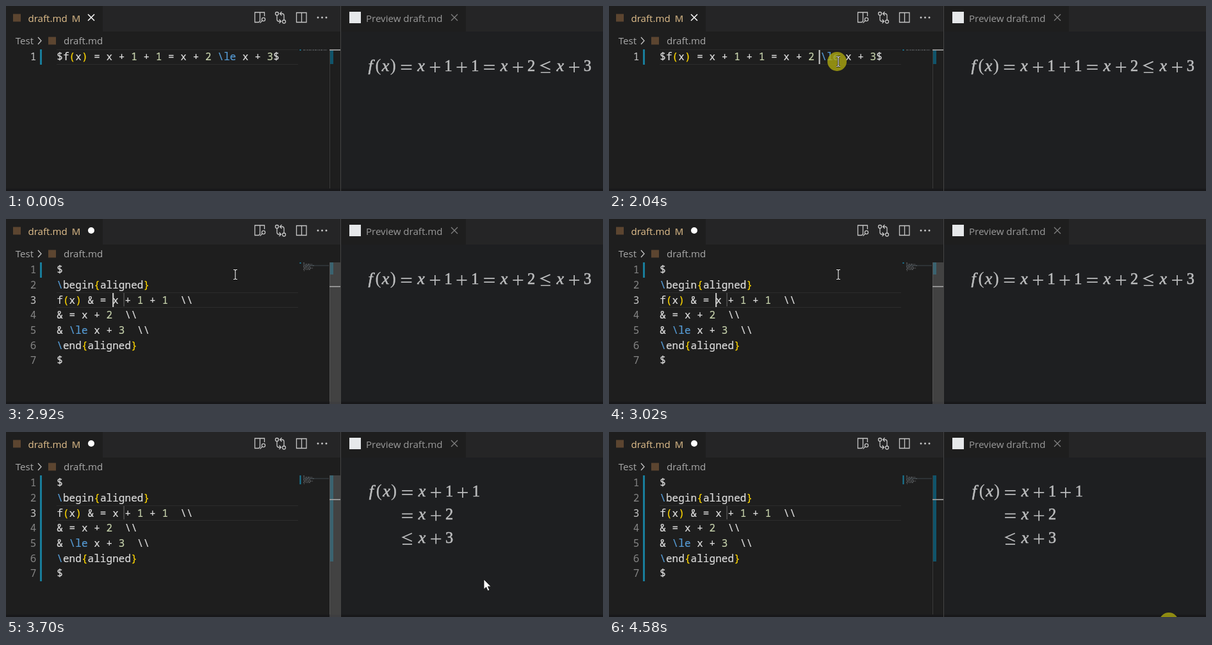
Write an HTML page that moves like this. It is 932 px wide and 290 px high and loops after 4.81 s.

```html
<!DOCTYPE html>
<html lang="en">
<head>
<meta charset="utf-8">
<title>Aligning a formula</title>
<style>
  html, body { margin: 0; width: 100%; height: 100%; overflow: hidden; background: #1e1e1e; }
  svg { display: block; }
  text { white-space: pre; }
  .ui { font: 15.1px "Open Sans", "Noto Sans", sans-serif; }
  .code { font: 16px "Noto Sans Mono", monospace; letter-spacing: .05px; fill: #dcdcdc; }
  .code tspan { stroke: currentColor; stroke-width: .2; color: #dcdcdc; }
  .code .cmd { fill: #569cd6; color: #569cd6; }
  .code .brk { fill: #ffd700; color: #ffd700; }
  .code .num { fill: #c6d2ac; color: #c6d2ac; }
  .math text { font: 24.2px "Liberation Serif", serif; fill: #bcbdbe; stroke: #bcbdbe; stroke-width: .6; text-anchor: middle; }
  .math .it { font-style: italic; font-size: 26px; }
  .math .par { font-size: 27px; stroke-width: .2; }
  .math path { stroke: #bcbdbe; stroke-width: 1.7; fill: none; }
  .icon { fill: none; stroke: #c5c5c5; stroke-width: 1.3; }
  .tiny { fill: none; stroke: #707478; stroke-width: 1.1; stroke-dasharray: 3 1 1 1 2 1; }
</style>
</head>
<body>
<svg width="932" height="290" viewBox="0 0 932 290">
  <rect width="932" height="290" fill="#1e1e1e"/>
  <rect x="151" width="371" height="40" fill="#252526"/>
  <rect x="718" width="214" height="40" fill="#252526"/>
  <rect x="523" y="40" width="409" height="250" fill="#1e1f21"/>
  <rect y="286.500" width="932" height="3.500" fill="#18181a"/>

  <!-- tabs and breadcrumb -->
  <rect x="11" y="12.500" width="12" height="12" fill="#5c4530"/>
  <rect x="66" y="48.500" width="12" height="12" fill="#5c4530"/>
  <rect x="536" y="9" width="18" height="18" fill="#e6e8ea"/>
  <g class="ui">
    <text x="34.500" y="24.500" fill="#e2c08d">draft.md</text>
    <text x="102.500" y="24.500" fill="#b59b73" font-weight="600">M</text>
    <text x="14.800" y="60" fill="#a9a9a9">Test</text>
    <text x="90" y="60" fill="#a9a9a9">draft.md</text>
    <text x="562" y="24.500" fill="#9a9a9a">Preview draft.md</text>
  </g>
  <path class="icon" d="M50 49l5 5.500l-5 5.500" stroke="#a9a9a9"/>
  <path id="saved" d="M128 13l10 10M138 13l-10 10" stroke="#fff" stroke-width="1.500"/>
  <circle id="unsaved" cx="133" cy="18" r="5" fill="#fff"/>
  <path d="M695 13l10 10M705 13l-10 10" stroke="#808080" stroke-width="1.300"/>

  <!-- editor actions -->
  <g class="icon">
    <path d="M396.500 10H388.500V25.500H394.500L396.500 23.500V10H403.500V16"/>
    <circle cx="402" cy="21" r="2.600"/><path d="M400 23l-3.500 3.500"/>
    <circle cx="423" cy="12" r="2.500"/><circle cx="434" cy="24.500" r="2.500"/>
    <path d="M423 14.500V21Q423 24 426 24H429M426.500 21l3 3l-3 3M434 22V15Q434 12 431 12H428M430.500 9l-3 3l3 3"/>
    <path d="M453.500 10.500H469V25.500H453.500ZM461.500 10.500V25.500"/>
  </g>
  <g fill="#c5c5c5"><circle cx="487" cy="18" r="1.500"/><circle cx="493.500" cy="18" r="1.500"/><circle cx="500" cy="18" r="1.500"/></g>

  <!-- editor -->
  <path id="row" d="M79 68.500H456M79 91.500H456" stroke="#2c2c2c"/>
  <rect id="sel" x="339.500" y="69" width="19" height="22" fill="#30485e"/>
  <rect id="gutter" x="53" y="68" width="3" fill="#187d9b"/>
  <g id="before" class="code"></g>
  <g id="after" class="code"></g>
  <rect id="stop" x="183.500" y="116" width="1.200" height="21" fill="#5c5c5c"/>
  <rect id="caret" width="2" height="22" fill="#d0d0cf"/>

  <!-- minimap and overview ruler -->
  <rect id="mark" x="458.500" y="68" width="2" fill="#187d9b"/>
  <path id="mini1" class="tiny" d="M464 69H501"/>
  <g id="mini7"></g>
  <path d="M505.500 68V286" stroke="#3a3a3a"/>
  <rect id="changed" x="506" y="68" width="5" fill="#10546a"/>
  <rect id="found" x="511" y="68" width="6" height="23" fill="#8c8c8c"/>
  <rect id="slider" x="505" y="68" width="18" height="222" fill="#797979" fill-opacity=".4"/>
  <rect id="place" x="505" width="18" height="1.800" fill="#9a9a9a"/>
  <path d="M522.500 0V290" stroke="#444"/>

  <!-- preview -->
  <g id="flat" class="math"></g>
  <g id="stacked" class="math"></g>

  <!-- pointer -->
  <circle id="press" r="15" fill="#b0ab10" fill-opacity=".78"/>
  <path id="arrow" d="M0 0V15.500L3.600 12.200L6.200 18L8.800 16.800L6.300 11.200H11Z" fill="#fff" stroke="#111" stroke-width=".8"/>
  <g id="beam" fill="none">
    <path d="M-3 -7.500H-1L0 -6.500L1 -7.500H3M0 -6.500V6.500M-3 7.500H-1L0 6.500L1 7.500H3" stroke="#111" stroke-width="2.600"/>
    <path d="M-3 -7.500H-1L0 -6.500L1 -7.500H3M0 -6.500V6.500M-3 7.500H-1L0 6.500L1 7.500H3" stroke="#e8e8e8" stroke-width="1.200"/>
  </g>
</svg>
<script>
const LOOP = 4810, LINE = 23.7, EM = 24.2;
const $ = id => document.getElementById(id);

function add(parent, tag, attrs, text) {
  const el = document.createElementNS("http://www.w3.org/2000/svg", tag);
  for (const k in attrs) el.setAttribute(k, attrs[k]);
  if (text) el.textContent = text;
  parent.append(el);
  return el;
}

// Code lines, coloured by token
function code(parent, lines, active) {
  lines.forEach((line, i) => {
    const y = 85.2 + LINE * i;
    add(parent, "text", { x: 47.5, y, "text-anchor": "end", fill: i === active ? "#c6c6c6" : "#858585" }, String(i + 1));
    const row = add(parent, "text", { x: 79.3, y });
    for (const part of line.match(/\\le|\\(?=[be])|[(){}]|\d|[^\\(){}\d]+|\\/g)) {
      const kind = part === "\\le" || (part === "\\" && /^\\[be]/.test(line)) ? "cmd"
        : /[(){}]/.test(part) ? "brk" : /\d/.test(part) ? "num" : "";
      add(row, "tspan", { class: kind }, part);
    }
  });
}

// Formula layout in em: glyph width, plus the space around operators
const WIDTH = { f: .597, "(": .389, ")": .389, x: .5715 };
const OPS = {
  "+": [.222, "M-8 0H8M0 -8V8"],
  "=": [.278, "M-8.300 -2.850H8.300M-8.300 2.850H8.300"],
  "≤": [.278, "M7.300 -8.800L-7 -2.600L7.300 3.700M-7.500 8.300H7.500"]
};
function math(parent, chars, x, y) {
  for (const c of chars) {
    const op = OPS[c];
    const w = (op ? .778 + 2 * op[0] : WIDTH[c] || .5) * EM;
    const mid = x + w / 2;
    if (op) add(parent, "path", { d: op[1], transform: `translate(${mid} ${y - EM / 4})` });
    else add(parent, "text", { x: mid, y, class: /[fx]/.test(c) ? "it" : /[()]/.test(c) ? "par" : "" }, c);
    x += w;
  }
}

code($("before"), ["$f(x) = x + 1 + 1 = x + 2 \\le x + 3$"], 0);
code($("after"), ["$", "\\begin{aligned}", "f(x) & = x + 1 + 1  \\\\", "& = x + 2  \\\\",
  "& \\le x + 3  \\\\", "\\end{aligned}", "$"], 2);

math($("flat"), "f(x)=x+1+1=x+2≤x+3", 561.8, 102);
const relX = 563.2 + 1.9465 * EM;
["f(x)=x+1+1", "=x+2", "≤x+3"].forEach((row, i) =>
  math($("stacked"), row, i ? relX : 563.2, 101 + 1.5 * EM * i));

[2, 14, 17, 12, 15, 12, 2].forEach((w, i) =>
  add($("mini7"), "path", { class: "tiny", d: `M464 ${69 + 2 * i}h${w}`, "stroke-dashoffset": 2 * i }));
add($("mini7"), "path", { d: "M464 73H504", stroke: "#3d474c" });

// Each row holds from its time until the next one
const POINTER = [
  [0], [1270, "arrow", 471, 174],
  [1500, "beam", 438, 148], [1610, "beam", 396, 114], [1720, "beam", 366, 93], [1820, "beam", 358, 87],
  [3480, "beam", 374, 94], [3590, "arrow", 548, 158], [3700, "arrow", 746, 231],
  [3810, "arrow", 842, 264], [3920, "arrow", 866, 273], [4040, "arrow", 869, 281], [4140]
];
const CARET = [
  [0], [2040, 327.5, 69], [2160, 358, 69], [2590], [2920, 166.2, 116], [3480], [3920, 166.2, 116], [4480]
];
const PRESS = [[0], [2040, 356, 87], [2280], [4580, 874, 298]];
const SLIDER = [[0, 0], [2920, 1], [4480, .5], [4580, 0]];

const at = (table, t) => table.findLast(step => step[0] <= t);
const show = (id, on) => { $(id).style.display = on ? "" : "none"; };
const move = (id, x, y) => $(id).setAttribute("transform", `translate(${x} ${y})`);

function place(id, x, y) {
  show(id, x !== undefined);
  if (x !== undefined) move(id, x, y);
}

function draw(t) {
  const edited = t >= 2920, rendered = t >= 3140;

  for (const id of ["before", "saved", "mini1"]) show(id, !edited);
  for (const id of ["after", "unsaved", "mini7", "stop"]) show(id, edited);
  show("flat", !rendered);
  show("stacked", rendered);

  const picked = t >= 2160 && !edited;
  show("sel", picked);
  show("found", picked);

  move("row", 0, edited ? 47 : 0);
  $("gutter").setAttribute("height", rendered ? 166 : 24);
  $("mark").setAttribute("height", rendered ? 14 : 2);
  $("changed").setAttribute("height", rendered ? 135 : edited ? 19 : 23);
  $("place").setAttribute("y", edited ? 105 : 68);
  $("slider").setAttribute("opacity", at(SLIDER, t)[1]);

  place("caret", ...at(CARET, t).slice(1));
  place("press", ...at(PRESS, t).slice(1));
  const [, shape, x, y] = at(POINTER, t);
  for (const id of ["arrow", "beam"]) place(id, shape === id ? x : undefined, y);
}

const start = performance.now();
function tick() {
  draw((performance.now() - start) % LOOP);
  requestAnimationFrame(tick);
}
tick();
</script>
</body>
</html>
```
